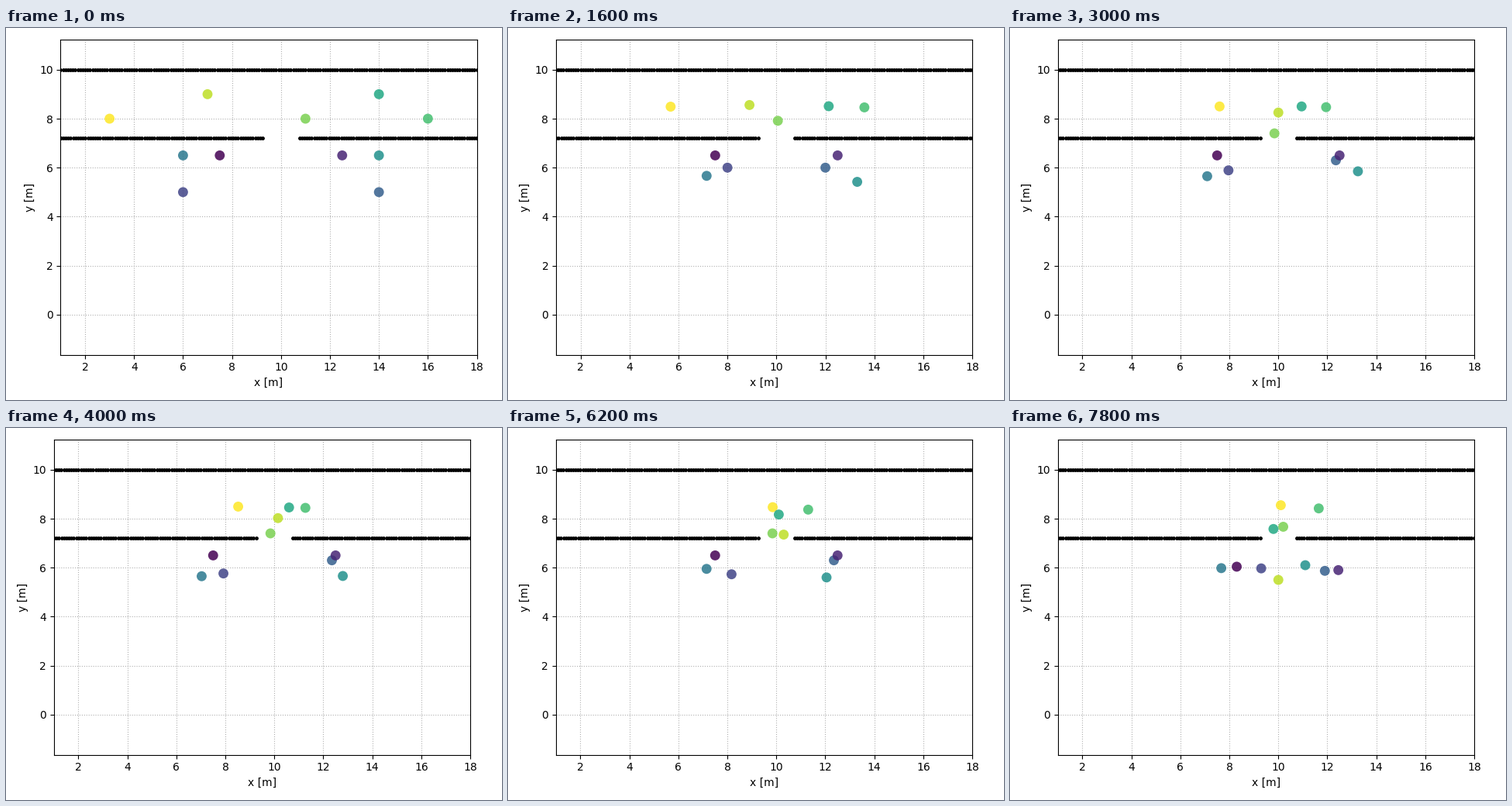
These frames come from a looping animation (640x480 px, 8000 ms). A matplotlib script:

```python
import numpy as np
import matplotlib.pyplot as plt
from matplotlib.animation import FuncAnimation

W, H, DPI = 640, 480, 100
FRAMES, INTERVAL = 40, 200
SCALE = 31.595                    # pixels per metre
X_MIN, X_MAX = 1, 18
TOP, BOTTOM, ZERO = 15.0, 421.72, 369.77   # pixel rows: axes top, bottom, y = 0
GO, END = 31, FRAMES - 1          # the queue starts to move, last step
STEPS = np.arange(FRAMES)


def smooth(t, v):
    """Cubic curve through (t, v) at every step, without overshoot."""
    d = np.diff(v) / np.diff(t)
    a, b = d[:-1], d[1:]
    same = a * b > 0
    inner = np.where(same, 2 * a * b / np.where(same, a + b, 1), 0)
    m = np.concatenate([d[:1], inner, d[-1:]])
    i = np.clip(np.searchsorted(t, STEPS, side="right") - 1, 0, len(d) - 1)
    h = t[i + 1] - t[i]
    u = (STEPS - t[i]) / h
    return (v[i] + (v[i + 1] - v[i]) * u * u * (3 - 2 * u)
            + h * u * (1 - u) * (m[i] * (1 - u) - m[i + 1] * u))


def person(start, stops, queue, end, sidestep=True):
    """Walk via stops (step, x, y) to a place in the queue, then move on.

    With a sidestep, the person falls quickly into the lane of the first stop.
    """
    keys = [(0, *start), *stops, (GO, *queue), (END, *end)]
    t, x, y = np.array(keys, float).T
    shift = y[0] - y[1] if sidestep else 0
    y[0] -= shift
    return np.column_stack([smooth(t, x),
                            smooth(t, y) + shift * np.exp(-STEPS / 2)])


inside = [
    person((3, 8), [(15, 7.6, 8.5)], (9.85, 8.47), (10.1, 8.55)),
    person((7, 9), [(8, 8.9, 8.55), (15, 10, 8.25)], (10.3, 7.35), (10, 5.5)),
    person((11, 8), [(4, 10.35, 8.2), (14, 9.84, 7.4)], (9.84, 7.4), (10.2, 7.67)),
    person((16, 8), [(15, 11.95, 8.47), (25, 10.95, 8.4)], (11.3, 8.37), (11.65, 8.42)),
    person((14, 9), [(15, 10.95, 8.5)], (10.1, 8.17), (9.8, 7.58)),
]
outside = [
    person((14, 6.5), [(8, 13.3, 5.4), (15, 13.25, 5.85), (25, 12.25, 5.47)],
           (12.05, 5.6), (11.1, 6.1)),
    person((6, 6.5), [(8, 7.15, 5.65), (25, 7, 5.65)], (7.15, 5.95), (7.67, 5.98)),
    person((14, 5), [(8, 12, 6), (14, 12.35, 6.3)], (12.35, 6.3), (11.9, 5.87),
           sidestep=False),
    person((6, 5), [(8, 8, 6), (25, 7.9, 5.7)], (8.17, 5.73), (9.3, 5.97),
           sidestep=False),
    person((12.5, 6.5), [], (12.5, 6.5), (12.45, 5.9)),
    person((7.5, 6.5), [], (7.5, 6.5), (8.3, 6.04)),
]
people = np.stack(inside + outside, axis=1)

fig = plt.figure(figsize=(W / DPI, H / DPI), dpi=DPI, facecolor="white")
ax = fig.add_axes([0.1, 0.1, 0.8, 0.8])
ax.set_axisbelow(True)
ax.grid(linestyle=":")
ax.set_xlabel("x [m]")
ax.set_ylabel("y [m]")
ax.set_xticks(range(2, 19, 2))
ax.set_yticks(range(0, 11, 2))
ax.set_xlim(X_MIN, X_MAX)
ax.set_ylim((ZERO - BOTTOM) / SCALE, (ZERO - TOP) / SCALE)


def wall(start, stop, y):
    x = np.linspace(start, stop, round((stop - start) * 10) + 1)
    ax.plot(x, np.full_like(x, y), "k.", markersize=5)


wall(0, 20, 10)
wall(0, 9.25, 7.2)
wall(10.75, 20, 7.2)

dots = ax.scatter(*people[0].T, s=86, linewidths=0, alpha=0.85, zorder=3,
                  c=plt.cm.viridis(np.linspace(1, 0, people.shape[1])))


def draw(k):
    # the layout settles to the left during the first second
    left = 61.9 + 8.55 * 0.56 ** k
    ax.set_position([left / W, 1 - BOTTOM / H,
                     (X_MAX - X_MIN) * SCALE / W, (BOTTOM - TOP) / H])
    dots.set_offsets(people[k])
    return (dots,)


anim = FuncAnimation(fig, draw, frames=FRAMES, interval=INTERVAL,
                     repeat=True, repeat_delay=0, blit=False)
plt.show()
```
